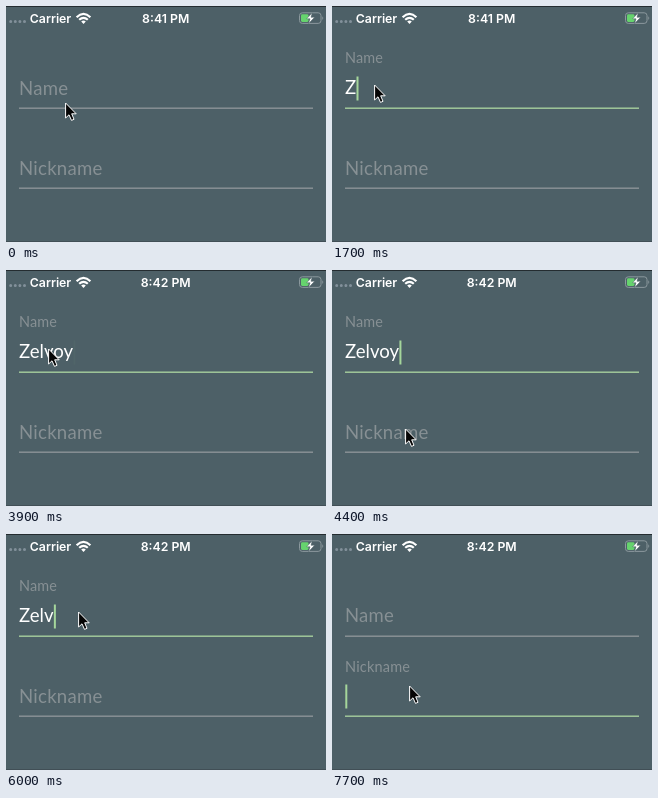
Animation, 320 px wide and 236 px high, one loop 8000 ms. Source, as an HTML page:

```html
<!DOCTYPE html>
<html lang="en">
<head>
<meta charset="utf-8">
<title>Floating label form</title>
<style>
  html, body { margin: 0; width: 100%; height: 100%; overflow: hidden; background: #4d6067; }
  svg { display: block; width: 100vw; height: 100vh; }
  text { white-space: pre; }
  .status { font: 600 12.3px Inter, Roboto, sans-serif; fill: #fff; }
  .field { font: 400 18.6px Lato, "Open Sans", sans-serif; }
  .label { fill: #879094; letter-spacing: .25px; }
  .value { fill: #fff; }
</style>
</head>
<body>
<svg viewBox="0 0 320 236" xmlns="http://www.w3.org/2000/svg">
  <rect width="320" height="236" fill="#4d6067"/>
  <path d="M0 .5H320" stroke="#242c30"/>
  <path d="M0 235.5H320" stroke="#414f56"/>

  <path d="M4.7 15.6H19" stroke="#82909a" stroke-width="3" stroke-linecap="round" stroke-dasharray="0 4.6"/>
  <text class="status" x="23.8" y="16.5">Carrier</text>
  <g fill="none" stroke="#fff" stroke-width="2.2">
    <path d="M70.6 11.2Q77.5 4.6 84.4 11.2"/>
    <path d="M73.2 13.8Q77.5 9.8 81.8 13.8"/>
  </g>
  <path d="M77.5 18L75.2 15.5Q77.5 13.7 79.8 15.5Z" fill="#fff"/>
  <text class="status" id="clock" x="159.7" y="16.5" text-anchor="middle"></text>
  <rect x="293.5" y="6.8" width="21.5" height="10.6" rx="2.8" fill="none" stroke="#8b989d"/>
  <path d="M316.3 10.2Q318.2 12 316.3 14Z" fill="#8b989d"/>
  <rect x="295" y="8.3" width="7.5" height="7.6" rx="1.3" fill="#66d36e"/>
  <path d="M306.2 6.8L300.6 12.8H304L302.6 17.6L308.6 11.3H305Z" fill="#fff" stroke="#4d6067" stroke-width=".5"/>

  <g id="form"></g>
  <path id="pointer" d="M.6 1V16L4 12.8L6.5 18.4L9 17.3L6.7 11.8H11.2Z"
        fill="#050505" stroke="#fff" stroke-linejoin="round"/>
</svg>
<script>
const LOOP = 8000, STEP = 100, LEFT = 13;
const NAME = "Zelvoy";
const GREY = "#8b9397", GREEN = "#a6cf9d";
const $ = id => document.getElementById(id);

const mix = (a, b, k) => a + (b - a) * k;
const clamp = (v, low, high) => Math.max(low, Math.min(high, v));
const ease = k => (k = clamp(k, 0, 1), k * k * (3 - 2 * k));

// Taps go to the two fields in turn, starting with the first.
const taps = [550, 4600, 5200, 7400];

// Five letters at a steady pace, a pause, then the last one.
const letterTime = i => i < NAME.length - 1 ? 1600 + 225 * i : 3200;
// Holding delete: one letter, a wait, then a quick repeat.
const eraseTime = i => i ? 5900 + 100 * i : 5600;

const home = { x: 59, y: 96 };
const moves = [
  { at: 50, x: 52, y: 76 },
  { at: 1300, x: 42, y: 78 },
  { at: 3900, x: 73, y: 158 },
  { at: 4600, x: 73, y: 69 },
  { at: 5050, x: 72, y: 77 },
  { at: 6750, x: 77, y: 151 }
];

function pointerAt(t) {
  let { x, y } = home, from = home;
  for (const to of moves) {
    const duration = 150 + 3 * Math.hypot(to.x - from.x, to.y - from.y);
    const k = ease((t - to.at) / duration);
    x = mix(x, to.x, k);
    y = mix(y, to.y, k);
    from = to;
  }
  return `${x} ${y}`;
}

function textAt(t) {
  let letters = 0, changed = 0;
  for (let i = 0; i < NAME.length; i++) {
    for (const [time, delta] of [[letterTime(i), 1], [eraseTime(i), -1]]) {
      if (time > t) continue;
      letters += delta;
      changed = Math.max(changed, time);
    }
  }
  return { text: NAME.slice(0, letters), changed };
}

// Fades towards the state that isOn reports for each tap so far.
function follow(t, isOn) {
  return taps.reduce((level, time, n) =>
    mix(level, isOn(n % 2, time) ? 1 : 0, ease((t - time) / 330)), 0);
}

// Solid, fade out, fade in, once a second.
function blink(age) {
  return clamp(Math.abs(age % 1000 - 760) / 180 - 0.3, 0, 1);
}

function add(tag, attrs, text = "") {
  const node = document.createElementNS("http://www.w3.org/2000/svg", tag);
  for (const key in attrs) node.setAttribute(key, attrs[key]);
  node.textContent = text;
  return $("form").appendChild(node);
}

const fields = ["Name", "Nickname"].map((title, i) => {
  const top = i * 80;
  return {
    top,
    label: add("text", { class: "field label" }, title),
    value: add("text", { class: "field value", x: LEFT, y: 88.2 + top }),
    line: add("rect", { x: LEFT, y: 101.5 + top, width: 294, height: 1.4 }),
    caret: add("rect", { y: 70.5 + top, width: 2, height: 24, fill: "#a5d69b" })
  };
});

function draw(t) {
  const { text, changed } = textAt(t);
  const past = taps.filter(time => time <= t);
  const focused = past.length ? (past.length - 1) % 2 : -1;
  const active = Math.max(changed, past.at(-1) ?? 0);

  fields.forEach((f, i) => {
    const isFocused = who => who === i;
    const isRaised = (who, time) => who === i || (i === 0 && textAt(time).text !== "");
    const lit = follow(t, isFocused), up = follow(t, isRaised);

    f.label.setAttribute("transform",
      `translate(${LEFT} ${mix(88.7, 57.2, up) + f.top}) scale(${mix(1, 0.775, up)})`);
    f.line.style.fill = `color-mix(in srgb, ${GREEN} ${lit * 100}%, ${GREY})`;
    f.value.textContent = i === 0 ? text : "";
    const width = f.value.textContent ? f.value.getComputedTextLength() : 0;
    f.caret.setAttribute("x", LEFT + 0.3 + width);
    f.caret.setAttribute("opacity", focused === i ? blink(t - active) : 0);
  });

  $("clock").textContent = t < 2200 ? "8:41 PM" : "8:42 PM";
  $("pointer").setAttribute("transform", `translate(${pointerAt(t)})`);
}

const began = performance.now();
function tick() {
  const t = (performance.now() - began) % LOOP;
  draw(Math.floor(t / STEP) * STEP);
  requestAnimationFrame(tick);
}
tick();
</script>
</body>
</html>
```
